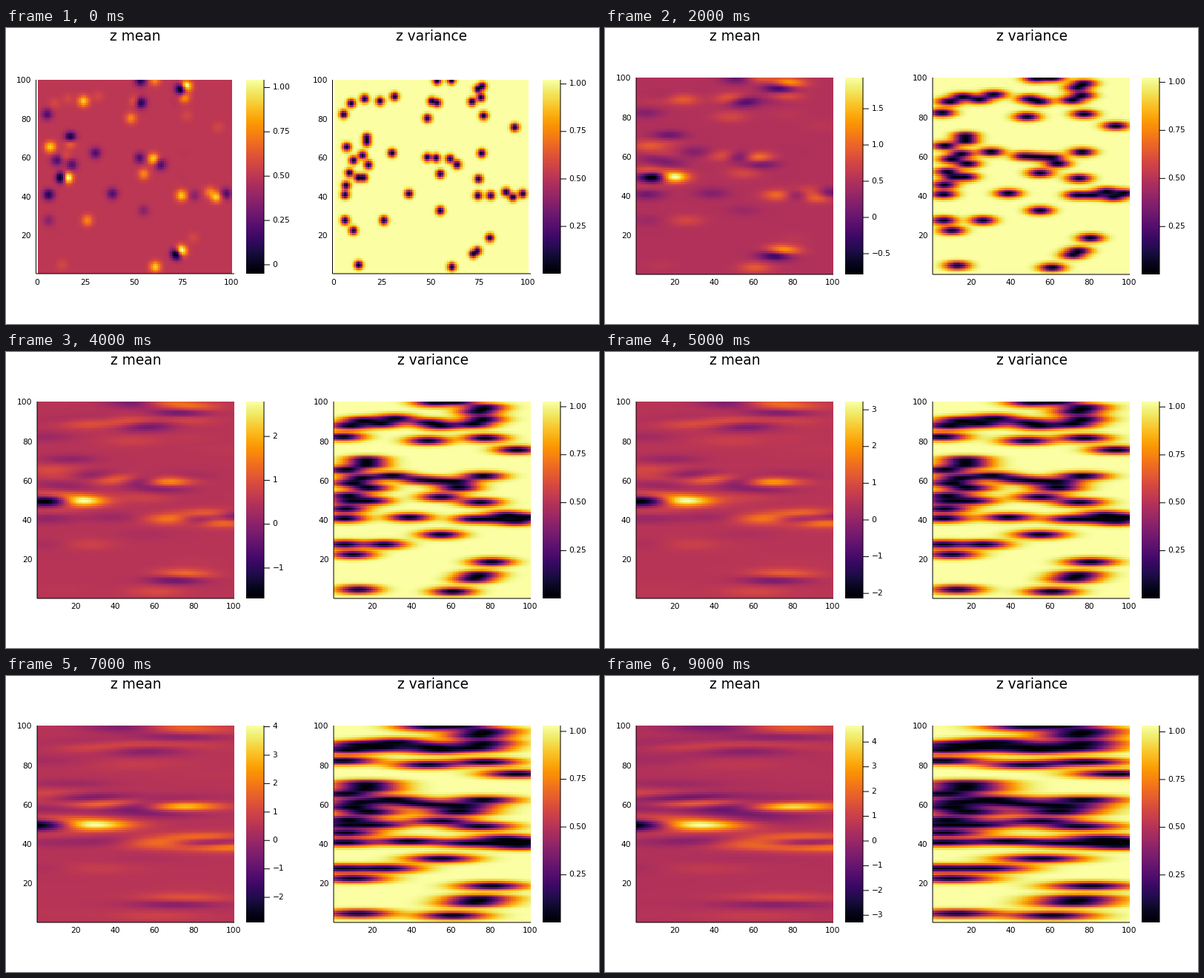
Animation, 800 px wide and 400 px high, one loop 10 s. Source, as a matplotlib script:

```python
import numpy as np
import matplotlib.pyplot as plt
from matplotlib.animation import FuncAnimation

plt.rcParams["font.family"] = "DejaVu Sans"
DPI = 100
PX = 72 / DPI
FRAMES = 10
PRIOR = 0.5
NOISE = 3e-4
LEN_Y = 2.0

# where the field was observed, grouped by the observed value
OBSERVED = {
    .08: [(53.4, 100), (74.6, 95.8), (53.4, 88.7), (17.2, 70.6), (13, 50),
          (6.1, 41.2), (72.2, 10.8)],
    .20: [(5.3, 82.7), (30.2, 62.7), (10.3, 59), (18, 56.7), (52.9, 60.2),
          (63.7, 56.8), (38.9, 41.7), (97.4, 41.7)],
    .36: [(81, 40.8), (55, 33), (6.1, 28)],
    .49: [(71.4, 89.2), (50.8, 89.4), (17.2, 68.5), (48.4, 60.5), (8.2, 52.5),
          (6.6, 46), (76.4, 62.6), (74.8, 49.3), (10.3, 22.8)],
    .57: [(9.2, 88.4), (16, 90.7), (31.5, 91.9), (77.4, 82), (93.4, 76),
          (15, 61.6), (80.6, 19), (13, 5)],
    .76: [(60.7, 100.3), (76, 91.4), (48.4, 80.7), (55, 52), (88.9, 42.6),
          (26, 28)],
    .92: [(76.6, 97.1), (24, 89.5), (6.9, 65.8), (60, 59.8), (15.25, 50),
          (74.5, 40.8), (92.4, 40), (74, 12.1), (61, 4)],
}
points = np.array([p for group in OBSERVED.values() for p in group])
values = np.array([z for z, group in OBSERVED.items() for _ in group])
cells = np.arange(1, 101)
grid = np.stack(np.meshgrid(cells, cells), axis=-1).reshape(-1, 2)
ramp = np.linspace(0, 1, 256)[:, None]


def kernel(a, b, len_x):
    d = (a[:, None] - b) / (len_x, LEN_Y)
    return np.exp(-np.sum(d ** 2, axis=-1) / 2)


def posterior(len_x):
    """Mean and variance of a Gaussian process on the 100 x 100 grid."""
    cov = kernel(points, points, len_x) + NOISE * np.eye(len(points))
    cross = kernel(grid, points, len_x)
    weights = np.linalg.solve(cov, cross.T).T
    mean = PRIOR + weights @ (values - PRIOR)
    var = 1 - np.sum(cross * weights, axis=1)
    return mean.reshape(100, 100), var.reshape(100, 100)


fig = plt.figure(figsize=(800 / DPI, 400 / DPI), dpi=DPI, facecolor="white")
ax = fig.add_axes([0, 0, 1, 1])


def label(x, y, s, size=10.67, ha="center", va="center"):
    ax.text(x, y, s, fontsize=size * PX, ha=ha, va=va, color="black")


def line(xs, ys):
    ax.plot(xs, ys, color="black", lw=PX, solid_capstyle="butt", snap=False)


def image(data, box, lo, hi):
    ax.imshow(data, extent=box, origin="lower", cmap="inferno", vmin=lo,
              vmax=hi, interpolation="nearest", aspect="auto")


def number(v, step):
    if v == 0:
        return "0"
    digits = 2 if step < .5 else 1 if step < 1 else 0
    return f"{v:.{digits}f}".replace("-", "\u2212")


def panel(off, title, data, lo, hi, first):
    # the first frame has a slightly wider x range, so a smaller heatmap
    if first:
        left, right, bottom, top = 43, 305, 332, 70
        axis, mid, xticks = 40.5, 174.5, range(0, 101, 25)
    else:
        left, right, bottom, top = 42, 308, 333, 67
        axis, mid, xticks = 42, 175.5, range(20, 101, 20)
    unit = (right - left) / 100

    label(off + mid, 17, title, 18.67, va="baseline")
    image(data, (off + left, off + right, bottom, top), lo, hi)
    line([off + axis, off + 308], [bottom, bottom])
    line([off + axis, off + axis], [top, bottom])
    for t in xticks:
        label(off + left + (t - .5) * unit, 344, str(t))
    for t in range(20, 101, 20):
        label(off + axis - 6.5, bottom - (t - .5) * unit, str(t), ha="right")

    image(ramp, (off + 324, off + 348, bottom, top), 0, 1)
    line([off + 348, off + 348], [top, bottom])
    span = hi - lo
    step = .25 if span < 2 else .5 if span < 4 else 1
    for k in range(int(np.ceil(lo / step)), int(np.floor(hi / step)) + 1):
        v = k * step
        y = bottom - (v - lo) / span * (bottom - top)
        line([off + 348, off + 356], [y, y])
        label(off + 359.5, y - .3, number(v, step), ha="left")


def draw(i):
    ax.clear()
    mean, var = posterior(2.0 * (i + 1))
    peak = 1.022 + .0012 * i
    panel(0, "z mean", mean, mean.min(), mean.max(), i == 0)
    panel(400, "z variance", var * peak, .001, peak, i == 0)
    ax.set_xlim(0, 800)
    ax.set_ylim(400, 0)
    ax.axis("off")
    return []


anim = FuncAnimation(fig, draw, frames=FRAMES, init_func=lambda: [],
                     interval=1000, repeat=True, repeat_delay=0, blit=False)
plt.show()
```
